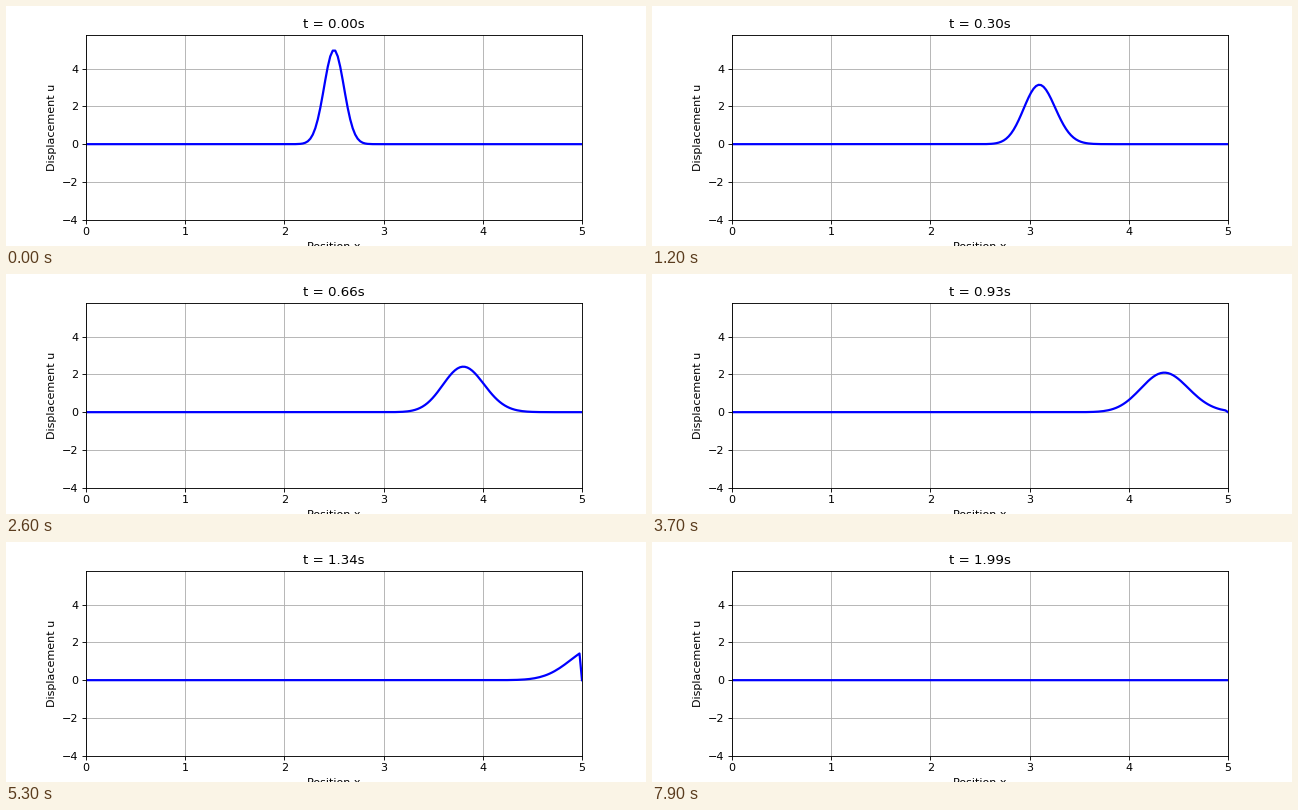
Recreate the animation shown at these times as a matplotlib script. Size 640 px wide and 240 px high, loop 8 s.

```python
import numpy as np
import matplotlib.pyplot as plt
from matplotlib.animation import FuncAnimation

LENGTH, SPEED = 5.0, 2.0
NODES = 200
FRAMES, INTERVAL = 80, 100
STEP = 2.5 / 99      # simulated seconds per frame
SUBSTEPS = 8

x = np.linspace(0, LENGTH, NODES)
dx = x[1] - x[0]


def slope(u):
    """Upwind advection with both ends held fixed."""
    du = np.zeros_like(u)
    du[1:-1] = -SPEED * (u[1:-1] - u[:-2]) / dx
    return du


def advance(u):
    h = STEP / SUBSTEPS
    for _ in range(SUBSTEPS):
        k1 = slope(u)
        k2 = slope(u + h / 2 * k1)
        k3 = slope(u + h / 2 * k2)
        k4 = slope(u + h * k3)
        u = u + h / 6 * (k1 + 2 * k2 + 2 * k3 + k4)
    return u


states = [5 * np.exp(-(x - LENGTH / 2) ** 2 / (2 * 0.1 ** 2))]
while len(states) < FRAMES:
    states.append(advance(states[-1]))

plt.rcParams["font.family"] = "DejaVu Sans"
fig, ax = plt.subplots(figsize=(8, 3), dpi=80)
line, = ax.plot(x, states[0], color="b", lw=2)
ax.set_xlim(0, LENGTH)
ax.set_ylim(-4, 5.8)
ax.set_xlabel("Position x")
ax.set_ylabel("Displacement u")
ax.grid(True)
title = ax.set_title("t = 0.00s")


def draw(i):
    line.set_ydata(states[i])
    title.set_text(f"t = {i * STEP:.2f}s")
    return line, title


anim = FuncAnimation(fig, draw, frames=FRAMES, interval=INTERVAL,
                     repeat=True, repeat_delay=0)
plt.show()
```
